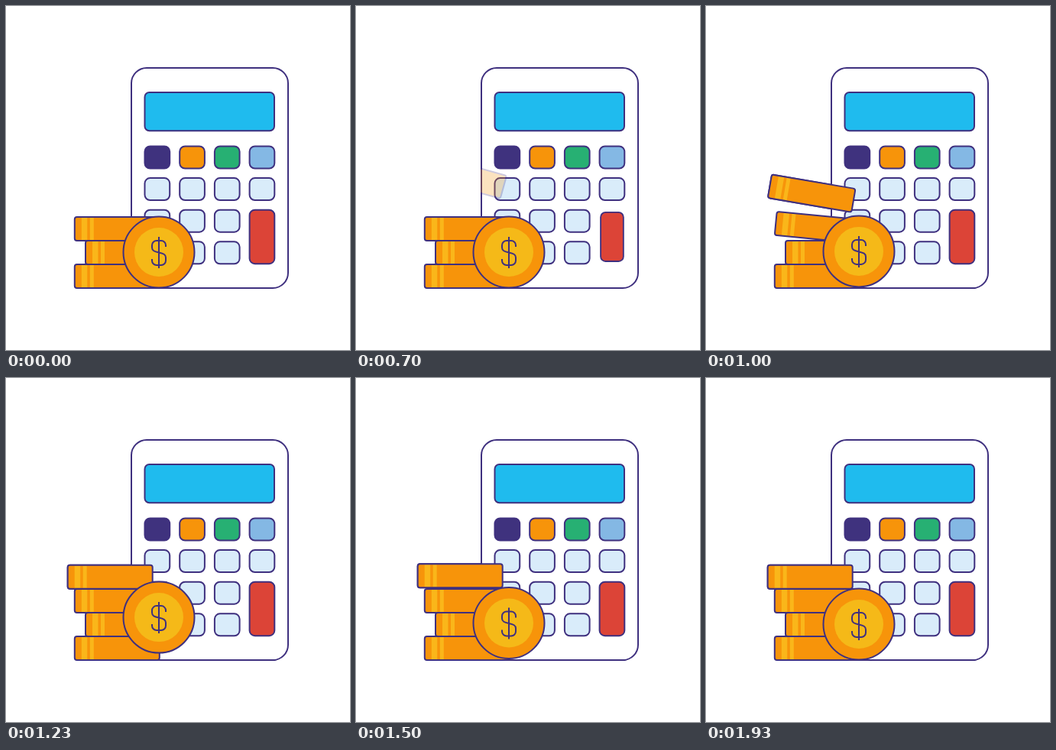
Animation, 450 px wide and 450 px high, one loop 2400 ms. Source, as an HTML page:

```html
<!DOCTYPE html>
<html lang="en">
<head>
<meta charset="utf-8">
<title>Calculator and coins</title>
<style>
html, body { margin: 0; width: 100%; height: 100%; overflow: hidden; background: #fff; }
svg { display: block; width: 100%; height: 100%; }
</style>
</head>
<body>
<svg viewBox="0 0 450 450" stroke="#3f307f" stroke-width="2" stroke-linejoin="round">
  <defs>
    <!-- Edge-on coin, centred on its own middle -->
    <g id="coin">
      <rect x="-55.5" y="-15.5" width="111" height="31" rx="3" fill="#f7940a" stroke="none"/>
      <path d="M-46.5-14.5h7.5v29h-7.5zM-35.5-14.5h5v29h-5z" fill="#fab61a" stroke="none"/>
      <rect x="-55.5" y="-15.5" width="111" height="31" rx="3" fill="none"/>
    </g>
    <clipPath id="body"><rect x="163" y="80" width="207" height="290" rx="21"/></clipPath>
  </defs>
  <use id="solid" href="#coin"/>
  <rect x="164" y="81" width="205" height="288" rx="20" fill="#fff"/>
  <rect x="181.5" y="113" width="169.5" height="50.3" rx="6" fill="#1fbbee"/>
  <g id="keys"></g>
  <use href="#coin" x="145.3" y="353.5"/>
  <use href="#coin" x="159.5" y="322.5"/>
  <use id="second" href="#coin"/>
  <g id="window"><use id="falling" href="#coin"/></g>
  <g id="front">
    <circle cx="200" cy="322" r="46.5" fill="#f7940a"/>
    <circle cx="200" cy="322" r="32" fill="#f5b918" stroke="none"/>
    <path d="M200 302v41M209 315v-2a6 6 0 0 0-6-6h-6a6 6 0 0 0-6 6v3c0 4 3 5.200 9 6.500s9 2.500 9 6.500v4a6 6 0 0 1-6 6h-6a6 6 0 0 1-6-6v-2" fill="none"/>
  </g>
</svg>
<script>
const LOOP = 2400;
const $ = id => document.getElementById(id);
const clamp = v => Math.min(1, Math.max(0, v));
const progress = (t, from, to) => clamp((t - from) / (to - from));
const pulse = (t, from, to) => Math.sin(Math.PI * progress(t, from, to));

function addKey(col, row, fill, height = 29) {
  const key = document.createElementNS('http://www.w3.org/2000/svg', 'rect');
  const box = { x: 181.5 + col * 45.7, y: 183.5 + row * 41.6, width: 32.7, height, rx: 7, fill };
  for (const name in box) key.setAttribute(name, box[name]);
  $('keys').append(key);
  return { key, cx: box.x + box.width / 2, cy: box.y + height / 2 };
}

['#3f327e', '#f7940a', '#27b073', '#84b8e4'].forEach((fill, col) => addKey(col, 0, fill));
const pale = [];
for (let row = 1; row < 4; row++)
  for (let col = 0; col < (row === 1 ? 4 : 3); col++) pale.push(addKey(col, row, '#d9ecfa'));
const red = addKey(3, 2, '#dc4437', 70.5);

function press({ key, cx, cy }, amount) {
  key.setAttribute('transform', `translate(${cx} ${cy}) scale(${1 - 0.09 * amount}) translate(${-cx} ${-cy})`);
}

function place(id, x, y, angle = 0) {
  $(id).setAttribute('transform', `translate(${x} ${y}) rotate(${angle})`);
}

function draw(t) {
  press(pale[1], pulse(t, 100, 600));
  press(red, pulse(t, 450, 950));

  // The coin drops, levels out on impact, then hops slightly
  const fall = progress(t, 620, 1107);
  const turn = fall ** 4;
  const hop = 1.6 * pulse(t, 1330, 1670) + 0.5 * pulse(t, 1670, 1930);
  const pose = [139.4 - 3.2 * turn, 221 + 39.3 * fall ** 2 - hop, 15.5 * (1 - turn)];
  place('falling', ...pose);
  place('solid', ...pose);

  // Outside the calculator the coin shows only once it is half opaque
  const alpha = progress(t, 620, 940);
  $('falling').setAttribute('opacity', alpha);
  $('solid').setAttribute('visibility', alpha < 0.5 ? 'hidden' : 'visible');
  $('window').setAttribute('clip-path', alpha < 0.5 ? 'url(#body)' : 'none');

  const tilt = pulse(t, 850, 1150);
  place('second', 145.3 + 1.2 * tilt, 291.5 - 1.8 * tilt, 5.5 * tilt);
  place('front', 0, -9 * pulse(t, 980, 1530));
}

const start = performance.now();
function tick() {
  draw((performance.now() - start) % LOOP);
  requestAnimationFrame(tick);
}
tick();
</script>
</body>
</html>
```
